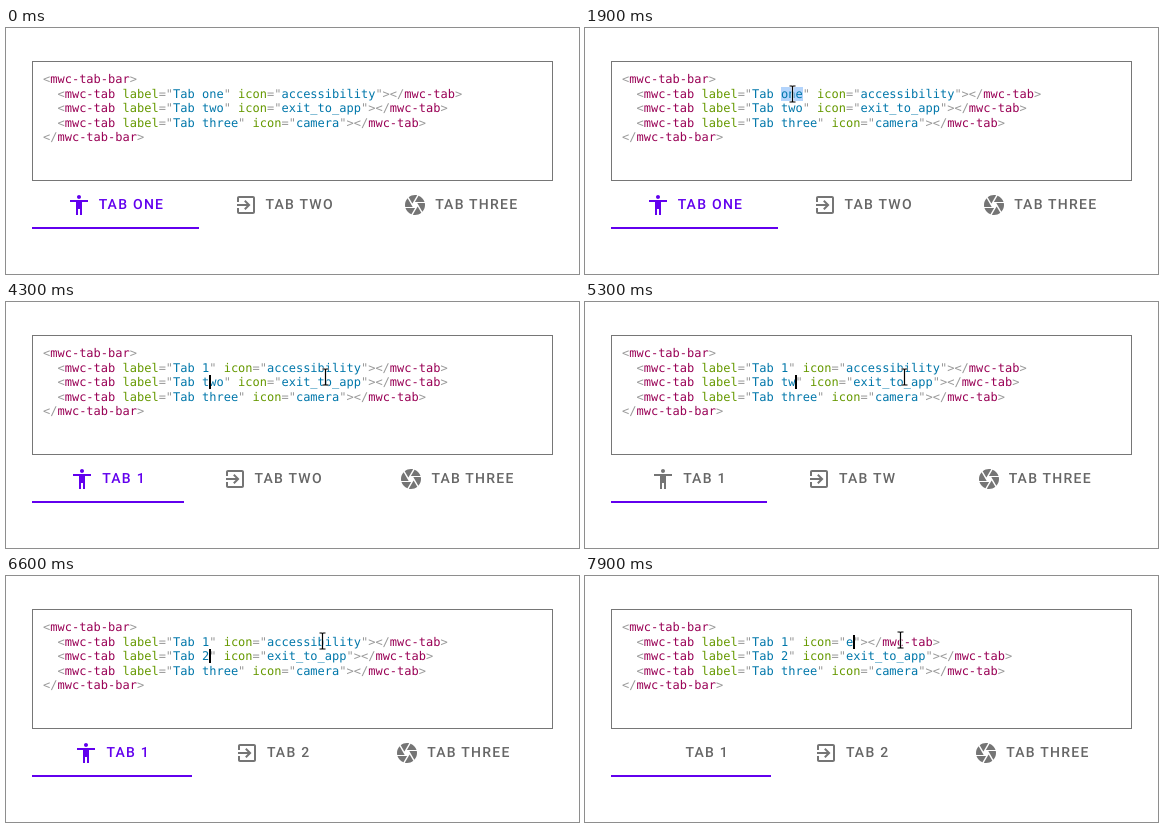
Write an HTML page that moves like this. It is 573 px wide and 246 px high and loops after 8000 ms.

```html
<!DOCTYPE html>
<html lang="en">
<head>
<meta charset="utf-8">
<title>Tab bar editor</title>
<style>
  html, body { margin: 0; width: 100%; height: 100%; overflow: hidden; background: #fff; }
  body { position: relative; text-rendering: geometricPrecision; }
  #editor {
    position: absolute; left: 26px; top: 33px; width: 521px; height: 120px;
    box-sizing: border-box; border: 1px solid #767676;
  }
  .line {
    position: absolute; left: 37px; white-space: pre; color: #999;
    font: 12px/14px "DejaVu Sans Mono", monospace;
  }
  .tag { color: #905; }
  .attr { color: #690; }
  .value { color: #07a; }
  #selection, #caret { position: absolute; height: 14px; }
  #selection { background: #b3d4fc; }
  #caret { width: 2px; background: #000; }
  #tabs { position: absolute; left: 26px; top: 153px; width: 521px; height: 48px; display: flex; }
  .tab {
    position: relative; flex: 1 0 auto; box-sizing: border-box; padding: 0 24px;
    display: flex; align-items: center; justify-content: center;
    font: 500 14px/14px Roboto, sans-serif; letter-spacing: .0892857em;
    text-transform: uppercase; white-space: nowrap; color: #666;
  }
  .tab svg { width: 24px; height: 24px; fill: #757575; }
  .tab span { padding-left: 8px; }
  #bar { position: absolute; left: 0; right: 0; bottom: 0; height: 2px; background: #6200ee; }
  #pointer { position: absolute; left: 0; top: 0; width: 20px; height: 24px; margin: -12px 0 0 -10px; }
  #pointer path { fill: none; stroke: #000; stroke-width: 1.2; }
  #pointer path:first-child { stroke: #fff; stroke-width: 2.6; stroke-opacity: .8; }
</style>
</head>
<body>
<div id="editor"></div>
<div id="selection"></div>
<div id="code"></div>
<div id="caret"></div>
<div id="tabs">
  <div class="tab" id="first">
    <svg viewBox="0 0 24 24"><path d="M12 2c1.1 0 2 .9 2 2s-.9 2-2 2-2-.9-2-2 .9-2 2-2zm9 7h-6v13h-2v-6h-2v6H9V9H3V7h18v2z"/></svg>
    <span>Tab one</span><div id="bar"></div>
  </div>
  <div class="tab" id="second">
    <svg viewBox="0 0 24 24"><path d="M10.09 15.59L11.5 17l5-5-5-5-1.41 1.41L12.67 11H3v2h9.67l-2.58 2.59zM19 3H5c-1.11 0-2 .9-2 2v4h2V5h14v14H5v-4H3v4c0 1.1.89 2 2 2h14c1.1 0 2-.9 2-2V5c0-1.1-.9-2-2-2z"/></svg>
    <span>Tab two</span>
  </div>
  <div class="tab">
    <svg viewBox="0 0 24 24"><path d="M9.4 10.5l4.77-8.26C13.47 2.09 12.75 2 12 2c-2.4 0-4.6.85-6.32 2.25l3.66 6.35.06-.1zM21.54 9c-.92-2.92-3.15-5.26-6-6.34L11.88 9h9.66zm.26 1h-7.49l.29.5 4.76 8.25C21 16.97 22 14.61 22 12c0-.69-.07-1.35-.2-2zM8.54 12l-3.9-6.75C3.01 7.03 2 9.39 2 12c0 .69.07 1.35.2 2h7.49l-1.15-2zm-6.08 3c.92 2.92 3.15 5.26 6 6.34L12.12 15H2.46zm11.27 0l-3.9 6.76c.7.15 1.42.24 2.17.24 2.4 0 4.6-.85 6.32-2.25l-3.66-6.35-.93 1.6z"/></svg>
    <span>Tab three</span>
  </div>
</div>
<svg id="pointer" viewBox="-10 -12 20 24">
  <path d="M-3-8H-1Q0-8 0-7V7Q0 8-1 8H-3M3-8H1Q0-8 0-7M0 7Q0 8 1 8H3"/>
  <path d="M-3-8H-1Q0-8 0-7V7Q0 8-1 8H-3M3-8H1Q0-8 0-7M0 7Q0 8 1 8H3"/>
</svg>
<script>
  const LOOP = 8000, BLINK = 620, CHAR = 7.2246, LEFT = 37;
  const $ = id => document.getElementById(id);
  const clamp = v => Math.min(1, Math.max(0, v));
  const lineTop = row => Math.round(44 + 14.5 * row);
  const colX = col => Math.round(LEFT + CHAR * col);

  // time, first label, second label, first icon
  const edits = [
    [-1000, 'Tab one', 'Tab two', 'accessibility'],
    [2800, 'Tab 1', 'Tab two', 'accessibility'],
    [5300, 'Tab 1', 'Tab tw', 'accessibility'],
    [5500, 'Tab 1', 'Tab t', 'accessibility'],
    [5700, 'Tab 1', 'Tab ', 'accessibility'],
    [6000, 'Tab 1', 'Tab 2', 'accessibility'],
    [7800, 'Tab 1', 'Tab 2', 'e']
  ];

  // time, row, column, selection end
  const carets = [
    [1700, 1, 22, 25], [2800, 1, 23], [4300, 2, 23], [4700, 2, 24], [4900, 2, 25],
    [5300, 2, 24], [5500, 2, 23], [5700, 2, 22], [6000, 2, 23],
    [7100, 1, 31, 44], [7800, 1, 32]
  ];

  // time, x, y
  const moves = [
    [200, 216, 33], [850, 209.5, 56], [1000, 209.5, 56], [1500, 207.5, 66],
    [1900, 207.5, 66], [2600, 316.5, 74], [3600, 316.5, 74], [4200, 319.5, 75],
    [6100, 319.5, 75], [6500, 316.5, 65], [7100, 316.5, 65], [7500, 315.5, 64]
  ];

  const last = (list, t) => list.filter(e => e[0] <= t).pop();
  const paint = (kind, text) => `<span class="${kind}">${text}</span>`;
  const attr = (name, value) => ` ${paint('attr', name)}="${paint('value', value)}"`;
  const tabLine = (label, icon) =>
    `  &lt;${paint('tag', 'mwc-tab')}${attr('label', label)}${attr('icon', icon)}&gt;&lt;/${paint('tag', 'mwc-tab')}&gt;`;

  let shown;
  function showEdit(edit) {
    if (edit === shown) return;
    shown = edit;
    const [, one, two, icon] = edit;
    const bar = paint('tag', 'mwc-tab-bar');
    $('code').innerHTML = [
      `&lt;${bar}&gt;`,
      tabLine(one, icon), tabLine(two, 'exit_to_app'), tabLine('Tab three', 'camera'),
      `&lt;/${bar}&gt;`
    ].map((html, i) => `<div class="line" style="top:${lineTop(i)}px">${html}</div>`).join('');
    $('first').querySelector('span').textContent = one.trim();
    $('second').querySelector('span').textContent = two.trim();
    $('first').querySelector('svg').style.visibility = icon === 'accessibility' ? 'visible' : 'hidden';
  }

  const mix = (a, b, k) => `rgb(${a.map((v, i) => Math.round(v + (b[i] - v) * k))})`;
  const active = [98, 0, 238];

  function showCaret(t) {
    const now = last(carets, t);
    const selected = now && now.length > 3;
    const on = now && !selected && Math.floor((t - now[0]) / BLINK) % 2 === 0;
    const sel = $('selection').style, car = $('caret').style;
    sel.display = selected ? 'block' : 'none';
    car.display = on ? 'block' : 'none';
    if (!now) return;
    const [, row, col, end] = now;
    sel.top = car.top = lineTop(row) + 'px';
    sel.left = car.left = colX(col) + 'px';
    if (selected) sel.width = colX(end) - colX(col) + 'px';
  }

  function showPointer(t) {
    const a = last(moves, t), style = $('pointer').style;
    style.display = a ? 'block' : 'none';
    if (!a) return;
    const b = moves[moves.indexOf(a) + 1] || a;
    const p = clamp((t - a[0]) / (b[0] - a[0] || 1));
    const k = p * p * (3 - 2 * p);
    const x = a[1] + (b[1] - a[1]) * k, y = a[2] + (b[2] - a[2]) * k;
    style.transform = `translate(${x}px, ${y}px)`;
  }

  function render(t) {
    const edit = last(edits, t);
    showEdit(edit);
    // a rebuilt tab starts grey, then fades to its active colour
    const k = clamp((t - edit[0] - 150) / 150);
    $('first').style.color = mix([102, 102, 102], active, k);
    $('first').querySelector('svg').style.fill = mix([117, 117, 117], active, k);
    showCaret(t);
    showPointer(t);
  }

  const start = performance.now();
  function tick(now) {
    render(Math.max(0, now - start) % LOOP);
    requestAnimationFrame(tick);
  }
  render(0);
  requestAnimationFrame(tick);
</script>
</body>
</html>
```
